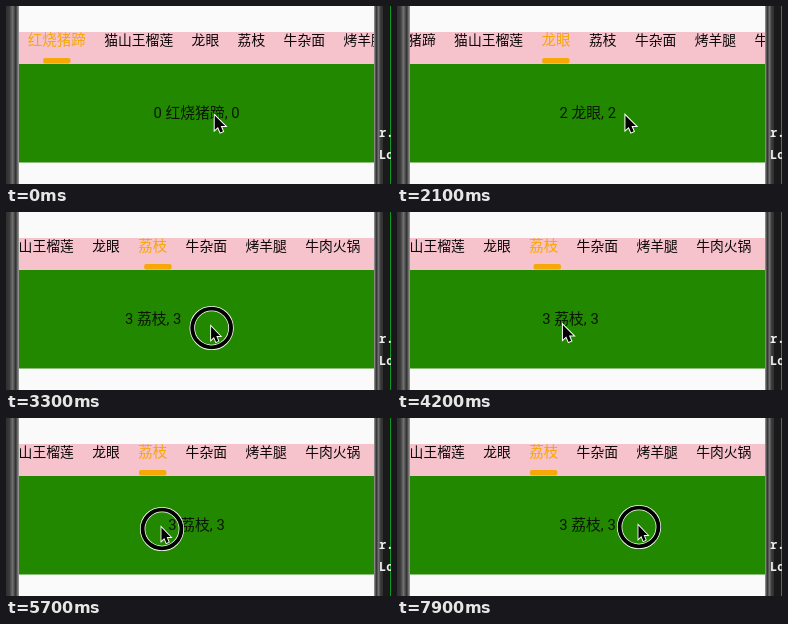
These frames come from a looping animation (385 by 178 pixels, 8000 ms). An HTML page with a canvas:

```html
<!DOCTYPE html>
<html lang="zh-CN">
<head>
<meta charset="utf-8">
<style>
  html, body { margin: 0; height: 100%; overflow: hidden; background: #fafafa; }
  canvas { display: block; }
</style>
</head>
<body>
<canvas id="stage" width="385" height="178"></canvas>
<script>
const ctx = document.getElementById('stage').getContext('2d');
const LOOP = 8000, STEP = 100, SETTLE = 500, SCROLL = 350;
const LEFT = 13, RIGHT = 368, PAGE = RIGHT - LEFT;
const FONT = 'Roboto, "Noto Sans CJK SC", "Noto Sans CJK", sans-serif';
const ORANGE = '#f7a707';
const TABS = ['红烧猪蹄', '猫山王榴莲', '龙眼', '荔枝', '牛杂面', '烤羊腿', '牛肉火锅'];
const SIZE = 13.8, SELECTED_SIZE = 14.5, PAD = 9.2;
const SCROLLS = [0, 0, 38.3, 96.6];

const drag = (down, up, x, y, dx, page) => ({ down, up, x, y, dx, page });
const drags = [
  drag(-SETTLE, -SETTLE, 186, 106, 0, 0),
  drag(700, 1000, 245, 114, -124, 1),
  drag(1400, 1650, 211, 109, -124, 2),
  drag(2150, 2400, 232, 109, -124, 3),
  drag(3175, 3970, 248, 114, -108, 3),
  drag(4600, 5200, 224, 109, -71, 3),
  drag(5700, 6200, 155, 109, 81, 3),
  drag(7150, 7500, 175, 108, 36, 3),
  drag(7900, LOOP, 241, 107, 0, 3)
];

const clamp = v => Math.max(0, Math.min(1, v));
const easeOut = v => 1 - (1 - clamp(v)) ** 3;
const smooth = v => clamp(v) ** 2 * (3 - 2 * clamp(v));
const mix = (a, b, k) => a + (b - a) * k;

// Everything that moves follows from the drag under way or the last one finished.
function stateAt(t) {
  const i = drags.findLastIndex(d => d.down <= t);
  const d = drags[i], start = i ? drags[i - 1].page : 0;
  const pressed = t < d.up;
  const moved = d.dx * easeOut((t - d.down) / (d.up - d.down || 1));
  const next = drags[i + 1] || d;
  const travel = pressed ? 0 : smooth((t - d.up) / (next.down - d.up));
  return {
    pressed,
    x: mix(d.x + moved, next.x, travel),
    y: mix(d.y, next.y, travel),
    position: mix(start - moved / PAGE, d.page, easeOut((t - d.up) / SETTLE)),
    selected: pressed ? start : d.page,
    scroll: mix(SCROLLS[start], SCROLLS[d.page], easeOut((t - d.up) / SCROLL))
  };
}

function rect(x, y, w, h, color) {
  ctx.fillStyle = color;
  ctx.fillRect(x, y, w, h);
}

function text(str, x, y, size, color) {
  ctx.font = `${size}px ${FONT}`;
  ctx.fillStyle = color;
  ctx.fillText(str, x, y);
}

function drawTabs({ selected, scroll }, position) {
  rect(LEFT, 26, PAGE, 32, '#f6c2cc');
  let x = LEFT - 0.4 - scroll;
  const centers = [];
  ctx.textAlign = 'left';
  TABS.forEach((name, i) => {
    const on = i === selected, size = on ? SELECTED_SIZE : SIZE;
    const width = name.length * size;
    text(name, x + PAD, 39.2, size, on ? ORANGE : '#0c0809');
    centers.push(x + PAD + width / 2);
    x += width + 2 * PAD;
  });
  const i = Math.floor(position);
  ctx.fillStyle = ORANGE;
  ctx.beginPath();
  ctx.roundRect(mix(centers[i], centers[i + 1], position - i) - 13.7, 52, 27.4, 5.6, 2);
  ctx.fill();
}

function drawPages(position) {
  rect(LEFT, 58, PAGE, 98.5, '#228800');
  ctx.textAlign = 'center';
  TABS.forEach((name, i) => {
    const x = (LEFT + RIGHT) / 2 + (i - position) * PAGE;
    text(`${i} ${name}, ${i}`, x, 112.4, 14.8, '#0a1605');
  });
}

function drawBezel(outer, inner) {
  const metal = ctx.createLinearGradient(outer, 0, inner, 0);
  ['#303030', '#383838', '#707070', '#303030', '#a0a0a0'].forEach((c, i) => metal.addColorStop(i / 4, c));
  rect(Math.min(outer, inner), 0, Math.abs(inner - outer), 178, metal);
}

function drawSurroundings() {
  drawBezel(0, LEFT);
  rect(376, 0, 8, 178, '#1a1a1a');
  drawBezel(377, RIGHT);
  rect(384, 0, 1, 178, '#0a9a20');
  ctx.textAlign = 'left';
  ctx.font = 'bold 12px "Noto Sans Mono", monospace';
  ctx.fillStyle = '#eee';
  ctx.fillText('r.', 373, 131);
  ctx.fillText('Lo', 373, 153);
}

function drawPointer({ x, y, pressed }) {
  if (pressed) {
    for (const [color, width] of [['#fff', 5.4], ['#000', 3.9]]) {
      ctx.strokeStyle = color;
      ctx.lineWidth = width;
      ctx.beginPath();
      ctx.arc(x + 1, y + 2, 19.4, 0, 2 * Math.PI);
      ctx.stroke();
    }
  }
  ctx.save();
  ctx.translate(x, y);
  if (pressed) ctx.scale(0.87, 0.92);
  const arrow = new Path2D('M.5 .5V15L3.8 12L6.2 17.4L8.8 16.2L6.5 11H11Z');
  ctx.lineWidth = 2;
  ctx.strokeStyle = '#fff';
  ctx.stroke(arrow);
  ctx.fillStyle = '#000';
  ctx.fill(arrow);
  ctx.restore();
}

function draw(now) {
  const t = Math.floor(now % LOOP / STEP) * STEP;
  const state = stateAt(t);
  rect(0, 0, 385, 178, '#fafafa');
  ctx.save();
  ctx.beginPath();
  ctx.rect(LEFT, 0, PAGE, 178);
  ctx.clip();
  drawTabs(state, stateAt(t - 30).position);
  drawPages(state.position);
  ctx.restore();
  drawSurroundings();
  drawPointer(state);
}

const began = performance.now();
function tick() {
  draw(performance.now() - began);
  requestAnimationFrame(tick);
}
tick();
</script>
</body>
</html>
```
